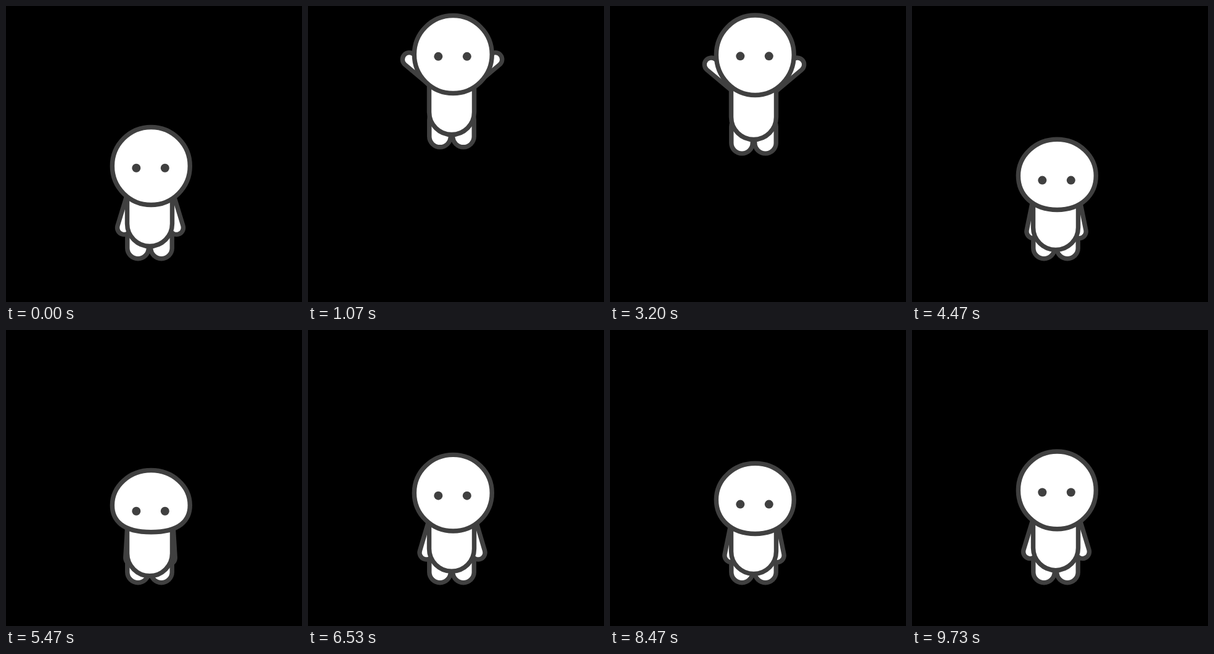
Write an HTML page with a canvas that moves like this. It is 480 by 480 pixels and loops after 9990 ms.

```html
<!DOCTYPE html>
<html lang="en">
<head>
<meta charset="utf-8">
<title>Jump</title>
<style>
  html, body { margin: 0; width: 100%; height: 100%; overflow: hidden; background: #000; }
  canvas { display: block; }
</style>
</head>
<body>
<canvas id="stage" width="480" height="480"></canvas>
<script>
const ctx = document.getElementById('stage').getContext('2d');
const LOOP = 9990, STEP = 1000 / 15, LAG = 15, HALF = 2000;
const INK = '#404040', LINE = 7.4;

const progress = (t, from, to) => Math.min(1, Math.max(0, (t - from) / (to - from)));
const easeOut = p => 1 - (1 - p) ** 3;
const smooth = p => p * p * (3 - 2 * p);
const ramp = (t, from, to) => smooth(progress(t, from, to));
const bump = (t, from, peak, to) => ramp(t, from, peak) - ramp(t, peak, to);

// Quick rise, short hover, accelerating fall
const liftAt = t => 186 * (easeOut(progress(t, 565, 955)) - progress(t, 1010, 1445) ** 2);

// One squash value, crouch to landing, drives the whole pose
function poseAt(t) {
  const squash = 35 * bump(t, 430, 525, 570) + 31 * bump(t, 1440, 1482, 1770);
  const stretch = 68 * bump(t, 565, 652, 830);
  const raise = easeOut(progress(t, 575, 715)) - ramp(t, 1318, 1415);
  return {
    body: 0.3 * squash - 0.22 * stretch,
    chin: 8 * Math.sin(Math.PI * squash / 40) - 0.69 * stretch,
    cheek: 0.8 * squash - 0.88 * stretch,
    crown: squash - stretch,
    jaw: 0.552 + 0.0002 * squash ** 2,
    arm: (17 - 0.014 * squash ** 2 + 113 * raise) * Math.PI / 180
  };
}

function paint() {
  ctx.fillStyle = '#fff';
  ctx.strokeStyle = INK;
  ctx.lineWidth = LINE;
  ctx.fill();
  ctx.stroke();
}

function limb(x1, y1, x2, y2, width) {
  ctx.lineCap = 'round';
  for (const [color, w] of [[INK, width + LINE], ['#fff', width - LINE]]) {
    ctx.strokeStyle = color;
    ctx.lineWidth = w;
    ctx.beginPath();
    ctx.moveTo(x1, y1);
    ctx.lineTo(x2, y2);
    ctx.stroke();
  }
}

// Round skull over a jaw that gets flatter when squashed
function head(x, side, top, bottom, jaw) {
  const r = 63, bend = (bottom - side) * 0.552;
  ctx.beginPath();
  ctx.ellipse(x, side, r, side - top, 0, Math.PI, 2 * Math.PI);
  ctx.bezierCurveTo(x + r, side + bend, x + r * jaw, bottom, x, bottom);
  ctx.bezierCurveTo(x - r * jaw, bottom, x - r, side + bend, x - r, side);
  ctx.closePath();
  paint();
}

function draw(t) {
  const { body, chin, cheek, crown, jaw, arm } = poseAt(t);
  const side = 259.5 + cheek;

  ctx.fillStyle = '#000';
  ctx.fillRect(0, 0, 480, 480);
  ctx.save();
  ctx.translate(0, -liftAt(t));

  for (const x of [214, 252]) limb(x, 366, x, 392.5, 34.5);

  for (const dir of [-1, 1]) {
    const x = 234 + dir * 25.7, y = 304.5 + 0.8 * body;
    limb(x, y, x + dir * 57.5 * Math.sin(arm), y + 57.5 * Math.cos(arm), 22);
  }

  ctx.beginPath();
  ctx.moveTo(196.5, side);
  ctx.arc(233, 353 + body, 36.5, Math.PI, 0, true);
  ctx.lineTo(269.5, side);
  paint();

  head(235.3, side, 196.5 + crown, 322.5 + chin, jaw);

  ctx.fillStyle = INK;
  for (const x of [211.3, 257.8]) {
    ctx.beginPath();
    ctx.arc(x, 262.8 + crown, 7, 0, 2 * Math.PI);
    ctx.fill();
  }
  ctx.restore();
}

const start = performance.now();

function tick() {
  const t = Math.max(0, performance.now() - start) % LOOP;
  const clock = Math.floor((t + 3.4) / STEP) * STEP + LAG;
  // Every second jump runs backwards
  const phase = clock % (2 * HALF);
  draw(Math.min(phase, 2 * HALF - phase));
  requestAnimationFrame(tick);
}
tick();
</script>
</body>
</html>
```
